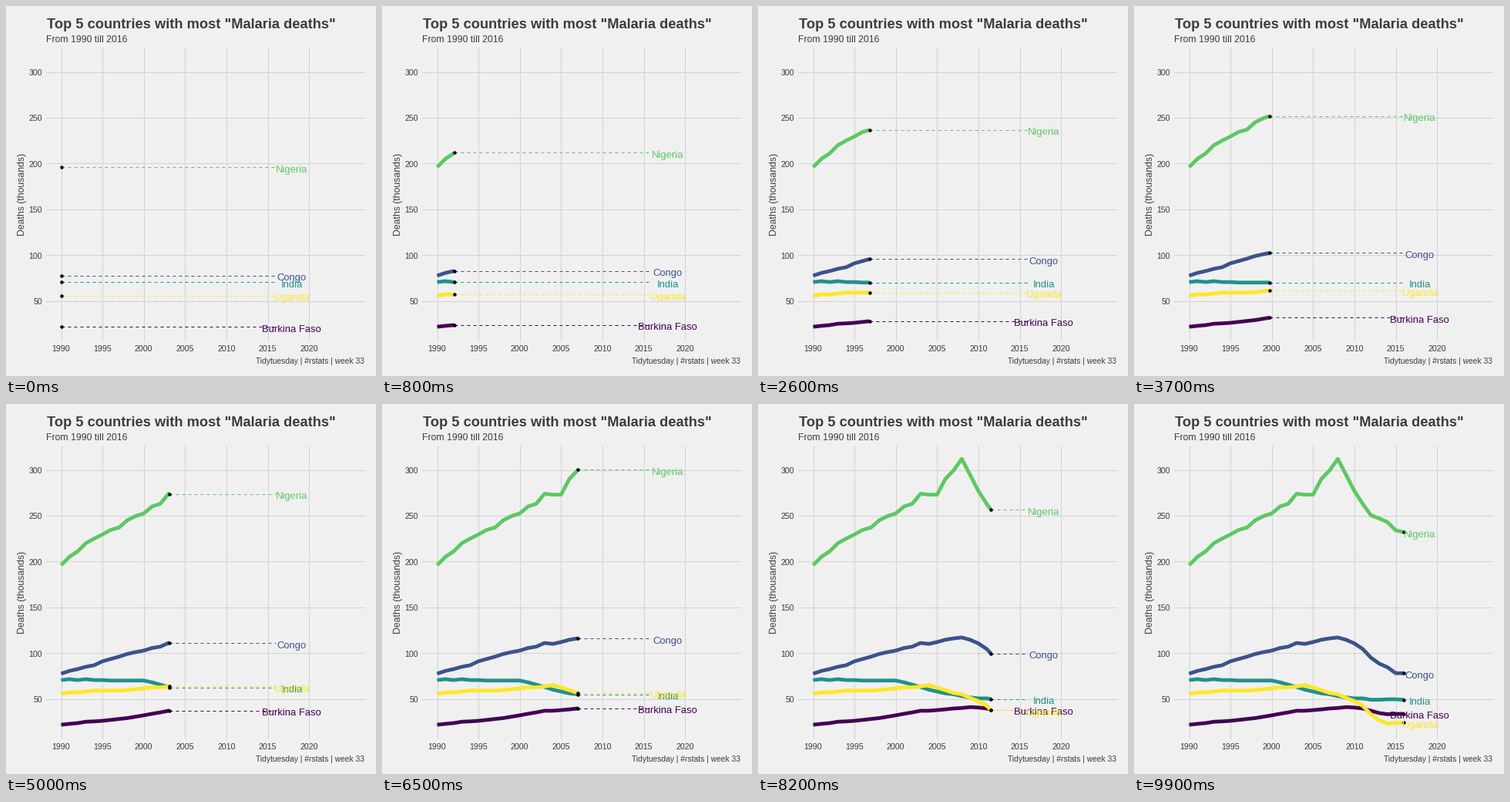
Recreate the animation shown at these times as a matplotlib script. Size 480 by 480 pixels, loop 10 s.

```python
import numpy as np
import matplotlib.pyplot as plt
from matplotlib.animation import FuncAnimation

SIZE, DPI = 480, 72          # at 72 dpi one point is one pixel
FRAMES, INTERVAL = 100, 100
INK = "#3c3c3c"
YEARS = np.arange(1990, 2017)

# Name: colour and yearly deaths in thousands, 1990 to 2016
SERIES = {
    "Burkina Faso": ("#440154", [
        21.7, 22.7, 23.5, 25, 25.4, 26, 27, 28, 29, 30.5, 32, 33.7, 35.2, 37,
        37, 37.7, 38.5, 39.5, 40, 41, 40.5, 39.5, 37, 34.5, 33.2, 33.5, 33.6]),
    "Congo": ("#3b528b", [
        77.5, 80.5, 82.5, 85, 86.7, 91, 93.5, 96, 99, 101, 102.7, 105.5, 107,
        111, 110, 112, 114.5, 116, 117, 114.5, 110.5, 104.5, 95, 88.5, 84.5,
        78, 78]),
    "India": ("#21908c", [
        70.5, 71.5, 70.5, 71.5, 70.5, 70.5, 70, 70, 70, 70, 70, 68, 65.5, 63,
        60, 58, 56, 55, 53, 51.5, 50.5, 50.5, 49, 49, 49.5, 49.5, 49]),
    "Nigeria": ("#5dc863", [
        196, 205, 211, 220, 225, 229.5, 234.5, 237, 245, 249.5, 252.5, 260,
        263, 274, 273, 273, 290, 299.5, 312, 294.5, 277, 263, 250.5, 247,
        243, 234, 232]),
    "Uganda": ("#fde725", [
        55.5, 57, 57, 58, 59, 59, 59, 59, 59.5, 60.5, 61.5, 62.5, 62.5, 63.5,
        65, 62.5, 59.5, 56.5, 55, 51, 47.5, 42.5, 33, 26.5, 23, 23.5, 24]),
}

plt.rcParams["font.family"] = "Liberation Sans"
fig = plt.figure(figsize=(SIZE / DPI, SIZE / DPI), dpi=DPI, facecolor="#f0f0f0")
ax = fig.add_axes([0, 0, 1, 1])
ax.set(xlim=(0, SIZE), ylim=(SIZE, 0))
ax.axis("off")


def px(year):
    return 71.5 + 10.72 * (np.asarray(year) - 1990)


def py(deaths):
    return 85.5 + 1.188 * (300 - np.asarray(deaths))


def write(x, y, text, size, ha="left", **kw):
    kw = {"color": INK, "va": "baseline", **kw}
    return ax.text(x, y, text, fontsize=size, ha=ha, **kw)


def draw_frame():
    grid = dict(color="#d2d2d2", lw=1, zorder=1)
    for year in range(1990, 2021, 5):
        ax.plot([px(year)] * 2, [54, 434], **grid)
        write(px(year), 448, str(year), 10.6, "center")
    for deaths in range(50, 301, 50):
        ax.plot([52, 465], [py(deaths)] * 2, **grid)
        write(47, py(deaths) + 4.5, str(deaths), 10.6, "right")
    write(53, 29, 'Top 5 countries with most "Malaria deaths"', 18.2, weight="bold")
    write(52, 47, "From 1990 till 2016", 12.3)
    write(465, 464, "Tidytuesday | #rstats | week 33", 10.25, "right")
    write(21, 244.5, "Deaths (thousands)", 12.3, "center", va="center", rotation=90)


class Country:
    def __init__(self, name, color, deaths):
        self.deaths = deaths
        self.line, = ax.plot([], [], color=color, lw=4.8, zorder=2, snap=False,
                             solid_capstyle="butt", solid_joinstyle="round")
        self.lead, = ax.plot([], [], color=color, lw=1, zorder=3,
                             dashes=(4, 4), dash_capstyle="butt")
        self.dot, = ax.plot([], [], "o", color="black", ms=4.5, mew=0, zorder=4)
        self.label = write(px(2018) - 0.8, 0, name, 13, "center", color=color, zorder=5)

    def reveal(self, year):
        value = np.interp(year, YEARS, self.deaths)
        past = YEARS < year
        x, y = px(year), py(value)
        self.line.set_data(np.append(px(YEARS[past]), x),
                           np.append(py(self.deaths)[past], y))
        self.lead.set_data([x, px(2016)], [y, y])
        self.dot.set_data([x], [y])
        self.label.set_y(y + 6.5)


draw_frame()
countries = [Country(name, *spec) for name, spec in SERIES.items()]


def update(i):
    year = 1990 + 26 * i / (FRAMES - 1)
    for country in countries:
        country.reveal(year)
    return []


anim = FuncAnimation(fig, update, frames=FRAMES, interval=INTERVAL,
                     repeat=True, repeat_delay=0, blit=False)
plt.show()
```
